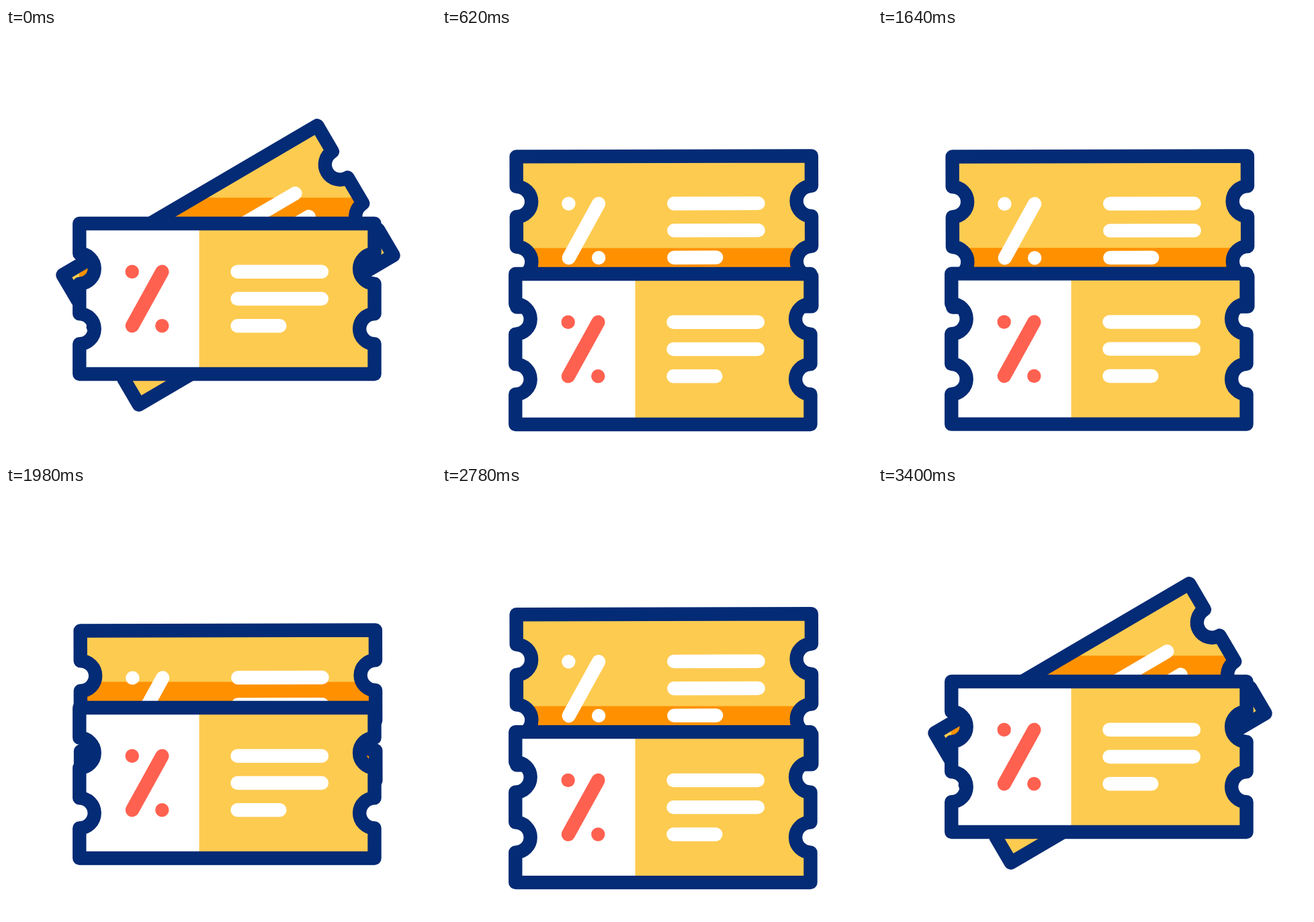
An HTML page with a canvas that plays this animation: 640 by 640 pixels, repeating every 3620 ms.

```html
<!DOCTYPE html>
<html lang="en">
<head>
<meta charset="utf-8">
<title>Discount tickets</title>
<style>
  html, body { margin: 0; width: 100%; height: 100%; overflow: hidden; background: #fff; }
  canvas { display: block; }
</style>
</head>
<body>
<canvas id="stage" width="640" height="640"></canvas>
<script>
const ctx = document.getElementById('stage').getContext('2d');
const NAVY = '#042b75', YELLOW = '#fdcb50', ORANGE = '#ff9100', CORAL = '#ff6150';
const LOOP = 3620, ACTIVE = 3400, HALF = ACTIVE / 6;

// Ticket outline around its centre, with two round notches on each side.
const W = 219.6, H = 112, S = 44.8, R = S / 2;
const side = d => `v${d * S}a${R} ${R} 0 0 0 0 ${d * S}`.repeat(2) + `v${d * S}`;
const ticket = new Path2D(`M${-W} ${-H}H${W}${side(1)}H${-W}${side(-1)}Z`);

const ease = u => u * u * (3 - 2 * u);
const mix = (a, b, k) => a + (b - a) * k;

function line(color, x1, y1, x2, y2) {
  ctx.strokeStyle = color;
  ctx.beginPath();
  ctx.moveTo(x1, y1);
  ctx.lineTo(x2, y2);
  ctx.stroke();
}

function drawTicket(x, y, angle, percentColor, nudgeX, nudgeY, paintInside) {
  ctx.save();
  ctx.translate(x, y);
  ctx.rotate(angle * Math.PI / 180);

  ctx.save();
  ctx.fillStyle = YELLOW;
  ctx.fill(ticket);
  ctx.clip(ticket);
  paintInside();
  ctx.restore();

  ctx.lineWidth = 20.4;
  ctx.lineCap = ctx.lineJoin = 'round';
  ctx.save();
  ctx.translate(nudgeX, nudgeY);
  line(percentColor, -141.2, -40.2, -141.2, -40.2);
  line(percentColor, -96.6, 40.3, -96.6, 40.3);
  line(percentColor, -141, 40.3, -96.5, -40.2);
  [[-40.2, 141], [0, 141], [40.3, 78.4]].forEach(([row, end]) => line('#fff', 15.6, row, end, row));
  ctx.restore();

  ctx.strokeStyle = NAVY;
  ctx.stroke(ticket);
  ctx.restore();
}

function draw(time) {
  const t = Math.min(time % LOOP, ACTIVE);
  const mirrored = Math.min(t, ACTIVE - t);
  const phase = mirrored / HALF;
  const spread = ease(phase % 2 > 1 ? 2 - phase % 2 : phase % 2);
  const angle = mix(-30.4, -0.13, ease(Math.min(phase, 1)));
  const frontY = mix(403, 480, spread);
  const backY = mix(353, 301.5, spread);

  ctx.fillStyle = '#fff';
  ctx.fillRect(0, 0, 640, 640);

  drawTicket(330.5, backY, angle, '#fff', -0.8, -1.4, () => {
    // The shadow of the front ticket stays level.
    ctx.setTransform(1, 0, 0, 1, 0, 0);
    ctx.fillStyle = ORANGE;
    ctx.fillRect(109, frontY - H - 38.5, 2 * W, 2 * H);
  });
  drawTicket(328.9, frontY, 0, CORAL, 0, 0, () => {
    ctx.fillStyle = '#fff';
    ctx.fillRect(-W, -H, W - 41.4, 2 * H);
  });
}

function tick() {
  draw(performance.now());
  requestAnimationFrame(tick);
}
tick();
</script>
</body>
</html>
```
